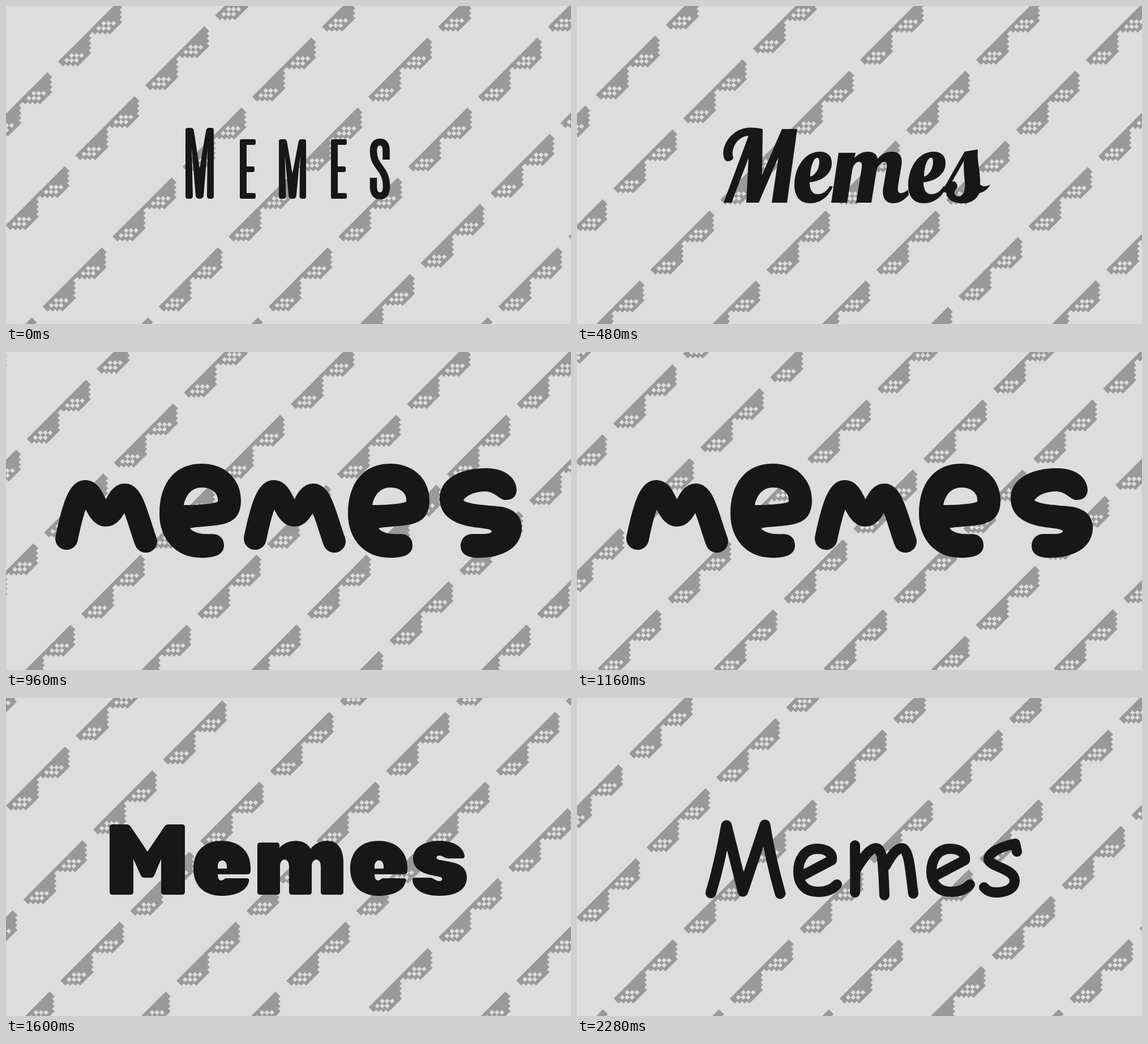
These frames come from a looping animation (998 px wide and 561 px high, 2320 ms). An HTML page with a canvas:

```html
<!DOCTYPE html>
<html lang="en">
<head>
<meta charset="utf-8">
<title>Memes</title>
<style>
html, body { margin: 0; width: 100%; height: 100%; overflow: hidden; background: #ddd; }
canvas { display: block; }
</style>
</head>
<body>
<canvas id="stage" width="998" height="561" role="img" aria-label="Memes"></canvas>
<script>
const ctx = document.getElementById('stage').getContext('2d');
const LOOP = 2320, TICK = 40, WORD_TIME = LOOP / 5;
const STEP = 123.4, SPEED = 0.1353, CELL = 4.35;

// Pixel sunglasses in grid cells, turned 45 degrees when drawn
const glasses = new Path2D('M0 0V2H1V3H2V4H3V5H8.5V4H9.5V3H10.5V2H11.5V1H13V2H14V3H15V4H16V5H21V4H22V3H23V2H24V0Z');
for (const lens of [0, 13])
  for (const col of [1.5, 3.5])
    for (let i = 0; i < 3; i++) glasses.rect(lens + col + i, 1 + i, 1, 1);

// One anchor per diagonal chain
const chains = [[-2, -16], [92, 98], [246, 140], [435, 160], [640, 160], [834, 160], [856, 330], [870, 530]];

// Glyphs are filled, or stroked when a line width is given
const glyph = (d, width = 0, cap = 'round') => ({ path: new Path2D(d), width, cap });

const tallM = glyph('M317 219Q317 215 321 215H327Q331 215 332 221L342 287L353 221Q354 215 358 215H363Q367 215 367 219V336Q367 340 363 340H360Q355 340 355 335L356 250L349 335Q348 340 342 340Q336 340 335 335L328 250L330 335Q330 340 325 340H321Q317 340 317 336Z');
const tallE = glyph('M416 235H438Q441 235 441 238V242Q441 245 438 245H425V283H436Q439 283 439 286V290Q439 293 436 293H425V330H438Q441 330 441 333V337Q441 340 438 340H416Q413 340 413 337V238Q413 235 416 235Z');
const tallS = glyph('M671.5 271V255Q671.5 240 660.5 240Q649 240 649 256C649 285 672 285 672 318Q672 335 660.5 335Q649 335 649 318V303', 12.5, 'butt');

const scriptM = glyph('M259 347L303 229C290 229 277 241 275 257C274 263 276 265 276 268C274 274 264 276 261 271C255 260 259 238 278 224C292 213 310 213 328 217L327 298L362 217H389L371 347H344L356 266L321 347H299L303 268L273 347Z');
const scriptE = glyph('M452 318C445 336 430 348 412 348C393 348 384 335 384 316C384 285 402 257 429 257C443 257 450 265 450 277C450 297 432 309 411 311C411 325 416 332 425 332C434 332 442 326 446 318ZM412 301C422 298 428 286 428 275C428 268 425 267 423 268C416 271 412 288 412 301Z');
const scriptm = glyph('M462 259H492L490 268C498 260 506 257 514 257C524 257 530 262 531 270C538 261 546 257 556 257C570 257 576 266 573 282L567 318C565 332 572 334 585 324L586 333C578 343 568 348 559 348C545 348 538 338 541 320L547 285C548 277 546 275 543 275C537 275 531 282 529 291L520 347H493L503 285C504 277 502 275 498 275C492 275 487 282 486 291L477 347H449Z');
const scriptS = glyph('M684 257L708 253C706 275 713 290 712 315C718 320 724 318 730 315C725 324 719 328 711 330C705 342 695 348 682 348C663 348 652 340 652 328C652 318 660 310 666 309C672 312 674 319 669 324C664 330 668 336 674 336C684 336 686 322 685 310C684 298 682 285 684 264Z');
const scriptLink = glyph('M648 328L687 260', 7, 'butt');

const chunkyM = glyph('M107 329C113 300 125 246 140 246C155 246 160 287 176 288C192 288 196 252 210 252C224 252 236 305 247 334', 40);
const chunkyE = glyph('M271 285C271 230 300 197 345 197C388 197 415 225 415 262C415 295 395 303 370 306C352 308 330 309 325 311C332 320 348 322 364 321C378 321 385 330 385 341C385 356 372 363 345 363C300 363 271 330 271 285ZM314 270C318 250 330 239 346 239C364 239 376 250 374 264C366 268 340 270 314 270Z');
const chunkyS = glyph('M902 244C901 257 892 262 880 261C868 257 862 246 846 246C828 246 813 253 808 262C822 270 850 270 875 273C898 277 912 290 911 313C909 345 878 363 835 363C812 363 803 355 803 341C804 328 812 321 825 321C840 321 858 322 858 316C856 311 835 311 815 307C785 300 766 285 766 258C766 225 800 205 848 205C885 205 902 225 902 244Z');

const blackM = glyph('M183 228Q183 223 188 223H213Q218 223 221 228L250 271L279 228Q282 223 287 223H311Q316 223 316 228V342Q316 347 311 347H279Q274 347 274 342V284L262 313Q260 317 256 317H244Q240 317 238 313L225 284V342Q225 347 220 347H188Q183 347 183 342Z');
const blackE = glyph('M432 300V305Q432 311 426 311H374C374 320 378 324 383 321L388 318H425Q431 318 429 324C425 340 407 349 381 349C351 349 331 332 331 301C331 270 351 252 381 252C413 252 432 271 432 300ZM374 301V297C374 283 390 283 390 297V301Z');
const blackm = glyph('M444 260Q444 255 449 255H478Q483 255 483 260V264C491 256 501 252 512 252C524 252 533 257 538 266C545 257 556 252 567 252C587 252 596 267 596 290V342Q596 347 591 347H561Q556 347 556 342V297C556 281 540 281 540 297V342Q540 347 535 347H505Q500 347 500 342V297C500 281 484 281 484 297V342Q484 347 479 347H449Q444 347 444 342Z');
const blackS = glyph('M718 322Q717 317 723 317H748C756 317 758 323 766 323C771 323 772 318 768 316C752 312 719 310 719 283C719 264 738 252 766 252C792 252 808 264 810 278Q811 283 805 283H782C774 283 772 278 765 278C760 278 759 283 763 285C782 290 814 288 814 317C814 338 795 349 766 349C737 349 720 338 718 322Z');

const penM = glyph('M236.5 344C246 312 256 270 264 225L293 341L332 224C339 268 349 310 359 345', 19);
const penE = glyph('M395 315L450 286C452 273 440 266 424 266C402 266 391 285 391 306C391 330 405 342 426 342C440 342 452 337 459 329', 18);
const penm = glyph('M491 260C491 300 492 320 491 343M493 302C504 285 516 265 528 265C541 265 541 300 543 348M545 296C554 280 564 265 574 265C587 265 589 310 594 345', 18);
const penS = glyph('M777 271L774 257C750 262 727 272 727 284C727 298 773 300 773 322C773 338 755 343 740 343C730 343 723 339 719 334', 18);

// Each entry: glyph, x, y, x scale, y scale
const words = [
  [[tallM], [tallE], [tallM, 177.7, 54.4, 0.96, 0.84], [tallE, 161], [tallS]],
  [[scriptM], [scriptE], [scriptm], [scriptE, 201], [scriptLink], [scriptS]],
  [[chunkyM], [chunkyE], [chunkyM, 333], [chunkyE, 333], [chunkyS]],
  [[blackM], [blackE], [blackm], [blackE, 277], [blackS]],
  [[penM], [penE], [penm], [penE, 235], [penS]]
];

function drawPattern(shift) {
  ctx.fillStyle = '#999';
  for (const [x, y] of chains) {
    for (let k = -8; k <= 8; k++) {
      const d = k * STEP + shift;
      ctx.setTransform(CELL, -CELL, CELL, CELL, x + d, y - d);
      ctx.fill(glasses, 'evenodd');
    }
  }
}

function drawWord(word) {
  ctx.fillStyle = ctx.strokeStyle = '#171717';
  ctx.lineJoin = 'round';
  for (const [g, x = 0, y = 0, sx = 1, sy = 1] of word) {
    ctx.setTransform(sx, 0, 0, sy, x, y);
    if (g.width) {
      ctx.lineWidth = g.width;
      ctx.lineCap = g.cap;
      ctx.stroke(g.path);
    } else {
      ctx.fill(g.path, 'evenodd');
    }
  }
}

function draw(now) {
  const t = Math.floor((now % LOOP) / TICK) * TICK;
  const index = Math.floor(t / WORD_TIME);
  // The pattern skips half a step when the third word cuts in
  const skip = index >= 2 ? STEP / 2 : 0;
  ctx.setTransform(1, 0, 0, 1, 0, 0);
  ctx.fillStyle = '#ddd';
  ctx.fillRect(0, 0, 998, 561);
  drawPattern((t * SPEED + skip) % STEP);
  drawWord(words[index]);
}

const start = performance.now();
function loop() {
  draw(performance.now() - start);
  requestAnimationFrame(loop);
}
loop();
</script>
</body>
</html>
```
